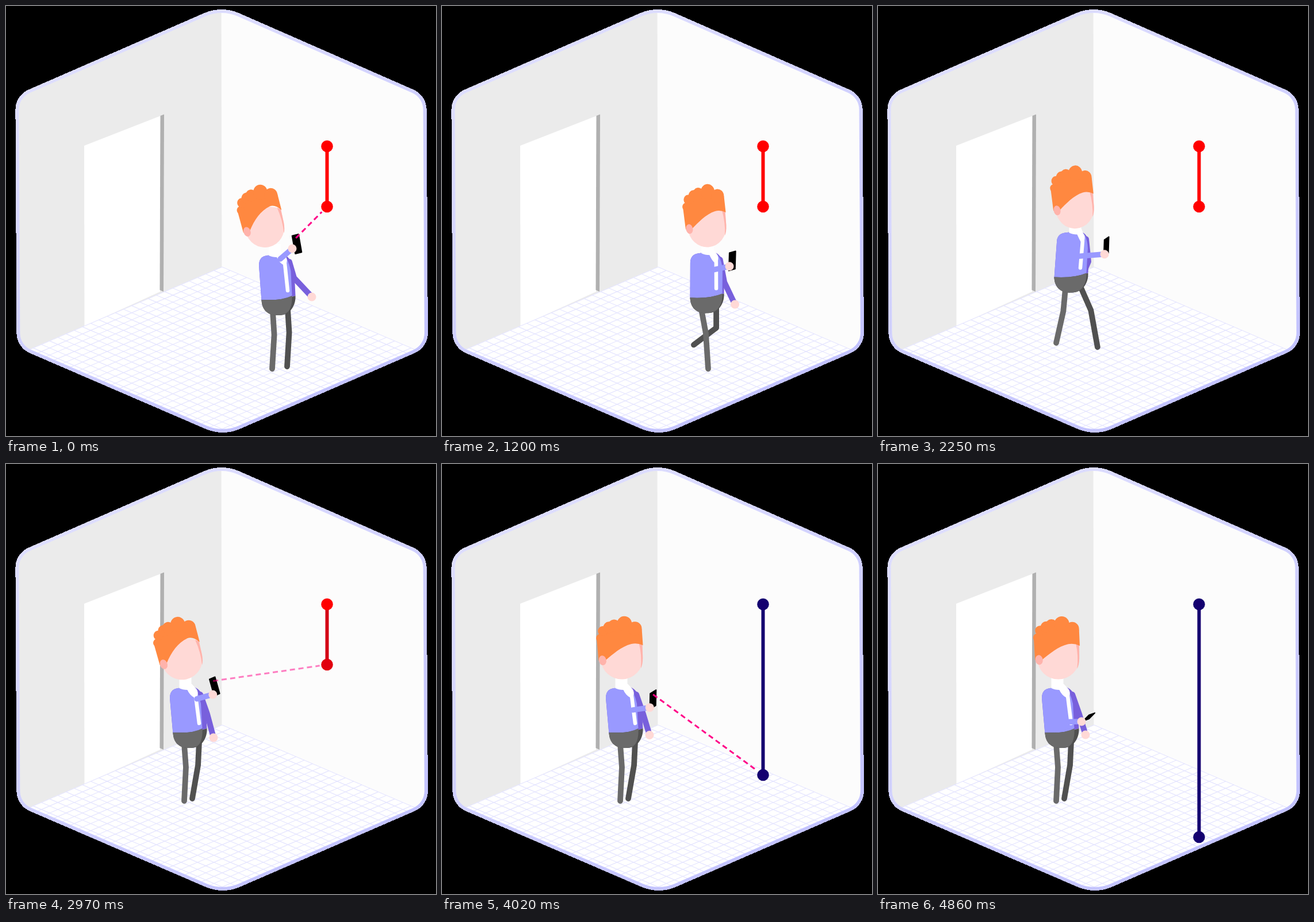
Recreate the animation shown at these times as an HTML page with a canvas. Size 748x748 px, loop 4.89 s.

```html
<!DOCTYPE html>
<html lang="en">
<head>
<meta charset="utf-8">
<title>Measuring a wall</title>
<style>
html, body { margin: 0; width: 100%; height: 100%; overflow: hidden; background: #000; }
canvas { display: block; }
</style>
</head>
<body>
<canvas id="stage" width="748" height="748"></canvas>
<script>
const SIZE = 748, LOOP = 4890, STEP = 30, TAU = Math.PI * 2;
const SKIN = '#ffd9d6', BLUSH = '#ffb3ab', HAIR = '#ff8840', SHIRT = '#9999ff', SLEEVE = '#7860dc';
const PANTS = '#6a6a6a', PANTS_DARK = '#505050';
const RED = [255, 0, 0], NAVY = [20, 0, 112];
const LINE_X = 558.5, LINE_TOP = 244;

const stage = document.getElementById('stage').getContext('2d');
let ctx = stage;

const ramp = (t, from, length) => Math.max(0, Math.min(1, (t - from) / length));
const ease = (t, from, length) => (1 - Math.cos(Math.PI * ramp(t, from, length))) / 2;
const lerp = (a, b, k) => a + (b - a) * k;
const mix = (a, b, k) => `rgb(${a.map((v, i) => Math.round(lerp(v, b[i], k)))})`;

function fill(path, color) {
  ctx.fillStyle = color;
  ctx.fill(new Path2D(path));
}

function poly(color, ...pts) {
  fill('M' + pts.join('L') + 'Z', color);
}

function line(color, width, ...pts) {
  ctx.strokeStyle = color;
  ctx.lineWidth = width;
  ctx.stroke(new Path2D('M' + pts.join('L')));
}

function dot(x, y, r, color) {
  ctx.fillStyle = color;
  ctx.beginPath();
  ctx.arc(x, y, r, 0, TAU);
  ctx.fill();
}

function roomOutline() {
  const corners = [[375, 2.3], [728.5, 157.4], [731, 591.8], [377, 745.3], [21.5, 591.8], [19.3, 157.4]];
  const path = new Path2D();
  path.moveTo(197, 80);
  corners.forEach((corner, i) => {
    path.arcTo(...corner, ...corners[(i + 1) % 6], i % 3 ? 35 : 72);
  });
  path.closePath();
  return path;
}

function drawRoom() {
  const outline = roomOutline();
  const border = ctx.createLinearGradient(120, 100, 500, 720);
  border.addColorStop(0, '#dedeff');
  border.addColorStop(1, '#c3c3ff');

  ctx.save();
  ctx.clip(outline);
  poly('#ebebeb', [0, 0], [SIZE, 0], [SIZE, SIZE], [0, SIZE]);
  poly('#fcfcfc', [374.5, 0], [SIZE, 0], [SIZE, SIZE], [376, SIZE]);
  poly('#fff', [376, 454], [SIZE, 613], [SIZE, SIZE], [0, SIZE], [0, 615]);
  poly('#fff', [136, 243], [269, 191], [268, 497], [136.5, 557]);
  poly('#b0b0b0', [268.5, 191], [275, 188.5], [274, 497], [267.5, 494]);
  const cells = 24;
  for (let i = 0; i <= cells; i++) {
    const x = 343 * i / cells, y = 454 + 147 * i / cells;
    line('#e5e5ff', 1.2, [376 - x, y], [719 - x, y + 147]);
    line('#e5e5ff', 1.2, [376 + x, y], [33 + x, y + 147]);
  }
  ctx.restore();
  ctx.strokeStyle = border;
  ctx.lineWidth = 6;
  ctx.stroke(outline);
}

// The room never changes; its outer edge is hard, without soft pixels.
function makeRoom() {
  const canvas = document.createElement('canvas');
  canvas.width = canvas.height = SIZE;
  ctx = canvas.getContext('2d');
  drawRoom();
  const image = ctx.getImageData(0, 0, SIZE, SIZE), px = image.data;
  for (let i = 3; i < px.length; i += 4) px[i] = px[i] > 127 ? 255 : 0;
  ctx.putImageData(image, 0, 0);
  ctx = stage;
  return canvas;
}

function drawMeasure(t, endY) {
  const tint = from => mix(RED, NAVY, ease(t, from, 600));
  line(tint(2800), 6, [LINE_X, LINE_TOP], [LINE_X, endY]);
  dot(LINE_X, LINE_TOP, 10.3, tint(2980));
  dot(LINE_X, endY, 10.3, tint(2830));
}

// Swings a foot from one spot to the next in an arc.
function swing(t, start, length, from, to, height) {
  const k = ease(t, start, length), lift = height * Math.sin(Math.PI * k);
  return { x: lerp(from[0], to[0], k), y: lerp(from[1], to[1], k) - lift, lift };
}

function drawLeg(hx, hy, foot, color) {
  const dx = foot.x - hx, dy = foot.y - hy;
  const bend = (3 + .65 * foot.lift) / Math.hypot(dx, dy);
  const knee = [hx + .41 * dx + bend * dy, hy + .41 * dy - bend * dx];
  line(color, 9.8, [hx, hy], knee, [foot.x, foot.y]);
}

function drawLegs(t, [x, y]) {
  const landing = [402, 604];
  const nearFoot = swing(t, 1260, 840, [463, 631], [310, 586], 28);
  const farFoot = t < 2050
    ? swing(t, 700, 900, [489, 627], landing, 25)
    : swing(t, 2050, 590, landing, [324, 582], 7);
  drawLeg(x + 16, y + 18, farFoot, PANTS_DARK);
  drawLeg(x - 10, y + 22, nearFoot, PANTS);
}

function torso(right, lean, color) {
  fill(`M-29.5,4L${-30 + lean},-58Q${-30 + lean},-73 ${-16 + lean},-75L${8 + lean},-78
    Q${right - 4 + lean},-76 ${right + lean / 2},-48L${right},-5Q5,4 -29.5,4Z`, color);
}

function trousers(right, color) {
  fill(`M-29.5,2Q5,4 ${right},-5C${right + 1},14 18,30 0,29C-18,30 -29,20 -29.5,2Z`, color);
}

function drawBody(hip, lean, shade) {
  ctx.save();
  ctx.translate(...hip);
  torso(29.5, lean, SLEEVE);
  torso(29.5 - shade, lean, SHIRT);
  trousers(29.5, PANTS_DARK);
  trousers(29.5 - shade, PANTS);
  const n = -11 + 1.5 * lean, s = 15 + lean;
  fill(`M${n},-95L${n},-75Q${n + 6},-72 ${n + 14},-72Q${n + 18},-63 ${s - 3},-59
    L${s + 2},-59Q${s + 6},-68 ${s + 1},-74L${n + 21},-83L${n + 21},-95Z`, '#fff');
  line('#fff', 6.5, [s, -61], [16, -14]);
  ctx.restore();
}

function drawHead(x, y, tilt, width) {
  const rise = Math.max(0, -tilt - 4) * .9; // the forehead shows more when looking up
  ctx.save();
  ctx.translate(x, y);
  ctx.rotate(tilt * Math.PI / 180);
  ctx.scale(width, 1);
  fill('M-36,-55L0,-74L37,-62L37,-36A36.5,36 0 0 1 -36,-36Z', SKIN);
  fill('M31,-63L37,-60L37,-36Q36.5,-24 33,-18Q36,-40 31,-63Z', BLUSH);
  fill(`M-40,-34L-42,-72L-30,-90L25,-96L37,-86L38,-58Q28,${-63 - rise} 18,${-61 - rise}
    C0,${-57 - rise} -15,${-44 - rise} -28,-34Z`, HAIR);
  const curls = [[-36, -73, 7], [-31, -85, 8.5], [-20, -91, 10], [-11, -94, 10.5], [7, -96.5, 13], [25, -87.5, 12]];
  curls.forEach(curl => dot(...curl, HAIR));
  ctx.beginPath();
  ctx.ellipse(-33, -34, 6.5, 8.5, -.15, 0, TAU);
  ctx.fillStyle = BLUSH;
  ctx.fill();
  ctx.restore();
}

function drawPhone(cx, cy, [ux, uy], [vx, vy]) {
  const corner = (a, b) => [cx + (a * ux + b * vx) * .46, cy + (a * uy + b * vy) * .46];
  const pts = [corner(-1, -1), corner(1, -1), corner(1, 1), corner(-1, 1)];
  poly('#000', ...pts);
  line('#000', 2, ...pts, pts[0]);
}

function drawBeam(t, x, y, endY) {
  const alpha = 1 - ramp(t, 30, 360) + ramp(t, 2850, 240) - ramp(t, 4400, 200);
  if (alpha <= 0) return;
  const dx = LINE_X - x, dy = endY - y, k = 1 - 13 / Math.hypot(dx, dy);
  ctx.save();
  ctx.globalAlpha = alpha;
  ctx.lineCap = 'butt';
  ctx.setLineDash([9, 6]);
  line('#ff0087', 3, [x, y], [x + dx * k, y + dy * k]);
  ctx.restore();
}

function drawPerson(t, endY) {
  // Progress of each action, 0 to 1.
  const aim = 1 - ease(t, 0, 570), walk = ease(t, 875, 1738), reach = ease(t, 900, 1000);
  const turn = ease(t, 2250, 550), look = ease(t, 2600, 550);
  const follow = ease(t, 3700, 400), lower = ease(t, 4350, 480);

  const lean = -4 + 9 * ramp(t, 0, 2250) - 10 * turn;
  const shade = 3 + 3 * aim + 5 * turn;
  const x = 474 - 154 * walk, y = 509 - 44 * walk;

  const handX = 34 - 10 * aim + 24 * reach - 24 * look + 8 * follow - 8 * lower;
  const handY = -54 - 33 * aim + 18 * walk - 37 * look + 35 * follow + 21 * lower;
  const hand = [x + handX, y + handY];
  const elbow = [x + 12 - 9 * aim, y + .85 * handY - 2 + 7 * aim];

  const farShoulder = [x + 22 + lean * .8, y - 64];
  const farElbow = [x + 30 - 3 * aim, y - 25 - 11 * aim - 5 * turn];
  const farHand = [x + 52 + 6 * aim - 42 * walk + 31 * turn, y + 14 - 17 * aim - 3 * walk - 5 * follow];

  const phoneX = hand[0] + 5 + 3 * aim - 2 * walk + 3 * follow + 7 * lower;
  const phoneY = hand[1] - 9 + aim - 5 * walk + 6 * lower;
  const across = [12 - 4 * walk + 3 * look, -3 - 3 * walk + 2 * look - 3 * follow + 3 * lower];
  const down = [-1 + 7 * aim + 13 * look - 14 * follow - 9 * lower,
    34 - 4 * walk + 2 * look - 3 * follow - 18 * lower];

  line(SLEEVE, 10, farShoulder, farElbow, farHand);
  dot(...farHand, 7.5, SKIN);
  drawLegs(t, [x, y]);
  drawBody([x, y], lean, shade);
  drawHead(x + 1 + 1.5 * lean - 12 * aim, y - 86.5 + .8 * lean,
    -4.5 - 8 * aim - 11 * look + 15 * follow, .92 + .02 * aim + .08 * look);
  line(SHIRT, 9.5, elbow, hand);
  drawPhone(phoneX, phoneY, across, down);
  drawBeam(t, phoneX - down[0] * .3, phoneY - down[1] * .3, endY);
  dot(...hand, 7.5, SKIN);
}

const room = makeRoom();

function render() {
  const t = Math.floor(performance.now() % LOOP / STEP) * STEP;
  const endY = 349 + 300 * ease(t, 3474, 925);
  ctx.clearRect(0, 0, SIZE, SIZE);
  ctx.lineCap = ctx.lineJoin = 'round';
  ctx.drawImage(room, 0, 0);
  drawMeasure(t, endY);
  drawPerson(t, endY);
  requestAnimationFrame(render);
}

render();
</script>
</body>
</html>
```
